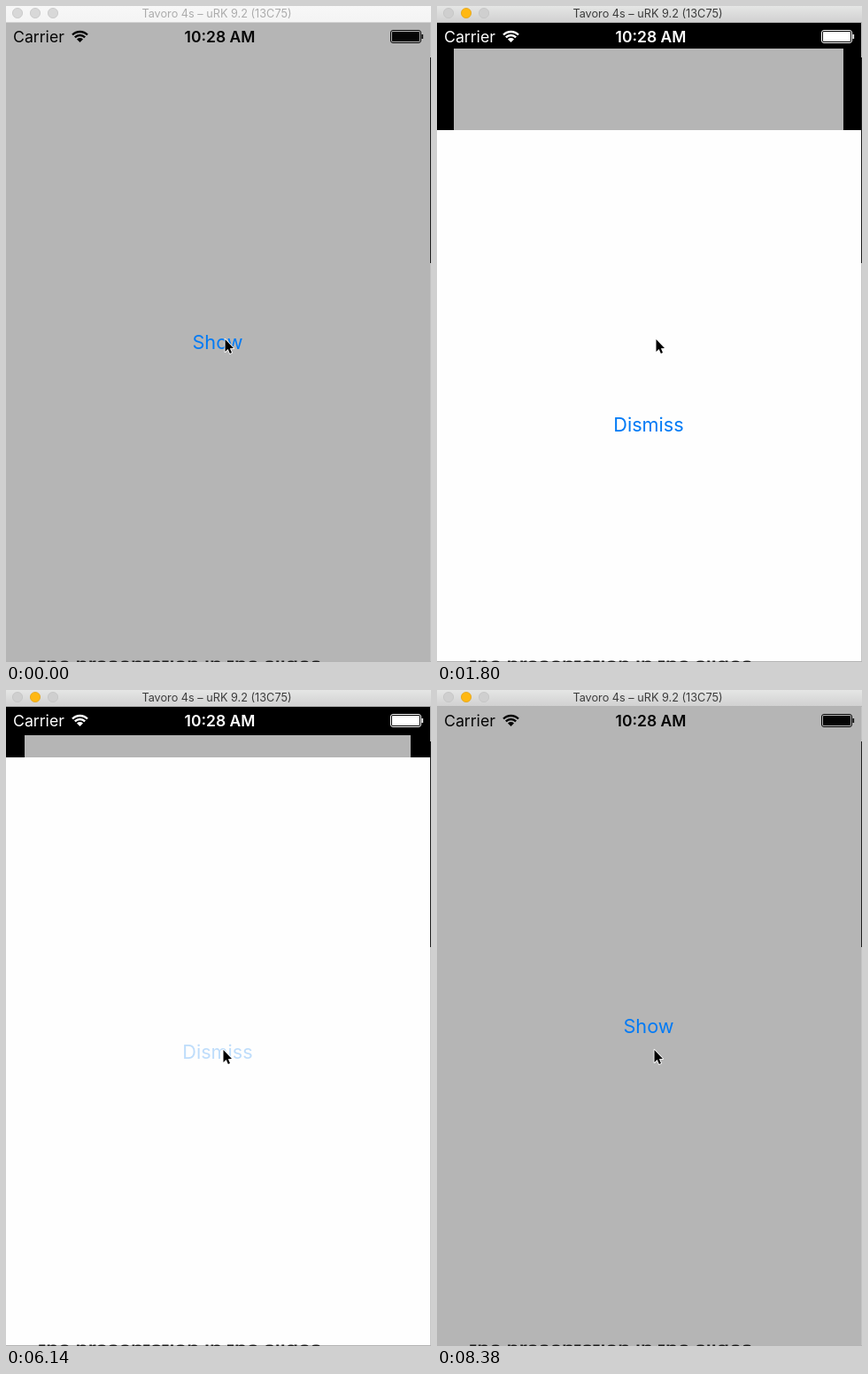
An HTML page with a canvas that plays this animation: 480x740 px, repeating every 8.48 s.

```html
<!DOCTYPE html>
<html lang="en">
<head>
<meta charset="utf-8">
<title>Sheet transition</title>
<style>
html, body { margin: 0; width: 100%; height: 100%; overflow: hidden; background: #b5b5b5; }
canvas { display: block; width: 480px; height: 740px; }
</style>
</head>
<body>
<canvas id="stage" width="480" height="740"></canvas>
<script>
const ctx = document.getElementById('stage').getContext('2d');
const LOOP = 8480;
const FOCUS = 840, PRESENT = 983, DISMISS = 6159, STATUS_BACK = 7300;
const MID_X = 239, MID_Y = 378, BOTTOM = 738, TRAVEL = 662, SHRINK = 0.0917;
const GRAY = '#b5b5b5', WHITE = '#fefefe', BLUE = '#007af5';

const clamp = v => Math.max(0, Math.min(1, v));
const mix = (a, b, k) => a + (b - a) * k;
const smooth = k => k * k * (3 - 2 * k);

// Critically damped spring, 0 to 1
function spring(ms) {
  if (ms <= 0) return 0;
  const x = ms * 0.0048;
  return 1 - (1 + x) * Math.exp(-x);
}

// Button dims while pressed and fades back after release
function pressAlpha(t, release) {
  if (t < release - 100) return 1;
  return mix(0.25, 1, clamp((t - release) / 350));
}

function rect(x, y, w, h, color) {
  ctx.fillStyle = color;
  ctx.fillRect(x, y, w, h);
}

function label(text, x, y, size, color, align = 'center', weight = 400) {
  ctx.font = `${weight} ${size}px Inter, "Liberation Sans", sans-serif`;
  ctx.textAlign = align;
  ctx.fillStyle = color;
  ctx.fillText(text, x, y);
}

function button(text, y, scale, alpha) {
  ctx.save();
  ctx.globalAlpha = alpha;
  ctx.translate(MID_X, y);
  ctx.scale(scale, scale);
  label(text, 0, 8, 21.7, BLUE);
  ctx.restore();
}

function titleBar(active) {
  const g = ctx.createLinearGradient(0, 0, 0, 18);
  g.addColorStop(0, active ? '#e5e6e5' : '#f7f7f7');
  g.addColorStop(1, active ? '#d1d1d1' : '#f4f4f4');
  rect(0, 0, 480, 18, g);
  rect(0, 18, 480, 1, active ? '#b4b4b4' : '#d2d2d2');
  for (let i = 0; i < 3; i++) {
    const on = active && i === 1;
    ctx.beginPath();
    ctx.arc(13 + 20 * i, 8, 5.6, 0, Math.PI * 2);
    ctx.fillStyle = on ? '#ffb813' : active ? '#cfcfcf' : '#d8d8d8';
    ctx.fill();
    ctx.strokeStyle = on ? '#e0a010' : '#c0c0c0';
    ctx.lineWidth = 0.7;
    ctx.stroke();
  }
  label('Tavoro 4s – uRK 9.2 (13C75)', 238, 13, 12.7, active ? '#3c3c3c' : '#acacac');
}

function wifi(color) {
  const x = 83.5, y = 41, a = Math.PI * 0.25;
  ctx.strokeStyle = color;
  ctx.lineWidth = 2.4;
  for (const r of [8, 12]) {
    ctx.beginPath();
    ctx.arc(x, y, r, -Math.PI / 2 - a, -Math.PI / 2 + a);
    ctx.stroke();
  }
  ctx.beginPath();
  ctx.moveTo(x, y);
  ctx.arc(x, y, 5, -Math.PI / 2 - a, -Math.PI / 2 + a);
  ctx.fillStyle = color;
  ctx.fill();
}

function battery(color) {
  ctx.beginPath();
  ctx.roundRect(434.5, 27.5, 34, 14, 2.5);
  ctx.strokeStyle = color;
  ctx.lineWidth = 1;
  ctx.stroke();
  ctx.beginPath();
  ctx.roundRect(436, 29, 31, 11, 1);
  ctx.fillStyle = color;
  ctx.fill();
  rect(469.5, 32, 1.6, 5, color);
}

function statusBar(color) {
  label('Carrier', 8, 41, 17.7, color, 'left');
  wifi(color);
  label('10:28 AM', 241.5, 41, 17.5, color, 'center', 600);
  battery(color);
}

// Sliver of the page behind the window
function surroundings() {
  rect(479, 19, 1, 721, '#c4c4c4');
  rect(479, 58, 1, 232, '#1c1c1c');
  rect(0, 739, 480, 1, '#b4b4b4');
  ctx.save();
  ctx.beginPath();
  ctx.rect(0, 738.5, 480, 2);
  ctx.clip();
  label('the presentation in the slides', 37, 751, 22.9, '#1c1c1c', 'left', 600);
  ctx.restore();
}

function pointer(x, y) {
  ctx.save();
  ctx.translate(x, y);
  ctx.beginPath();
  const shape = [[0.5, 0], [0.5, 14], [3.7, 11], [5.9, 16], [8, 15], [5.9, 10.2], [10, 10]];
  shape.forEach(([px, py]) => ctx.lineTo(px, py));
  ctx.closePath();
  ctx.strokeStyle = '#fff';
  ctx.lineWidth = 1.8;
  ctx.lineJoin = 'round';
  ctx.stroke();
  ctx.fillStyle = '#000';
  ctx.fill();
  ctx.restore();
}

function draw(t) {
  const p = spring(t - PRESENT) * (1 - spring(t - DISMISS));
  const scale = 1 - SHRINK * p;
  const half = 239.75 * scale;
  const top = Math.round(BOTTOM - TRAVEL * p);
  const left = Math.floor(MID_X - half);
  const right = Math.ceil(MID_X + half);
  const back = Math.round(19.2 + 32 * p);

  rect(0, 0, 480, 740, '#000');
  rect(left, back, right - left, 740 - back, GRAY);
  button('Show', MID_Y + scale, scale, pressAlpha(t, PRESENT));

  if (top < BOTTOM) {
    rect(0, top, 479, 739 - top, WHITE);
    ctx.save();
    ctx.beginPath();
    ctx.rect(0, top, 479, 739 - top);
    ctx.clip();
    button('Dismiss', top + 331.5, 1, pressAlpha(t, DISMISS));
    ctx.restore();
  }

  surroundings();
  titleBar(t >= FOCUS);
  const light = t >= PRESENT && t < STATUS_BACK;
  statusBar(light ? '#fff' : '#050505');

  const k = smooth(clamp((t - 4300) / 500));
  pointer(mix(247, 245, k), mix(376, 406, k));
}

const start = performance.now();
function tick() {
  draw((performance.now() - start) % LOOP);
  requestAnimationFrame(tick);
}
draw(0);
requestAnimationFrame(tick);
</script>
</body>
</html>
```
